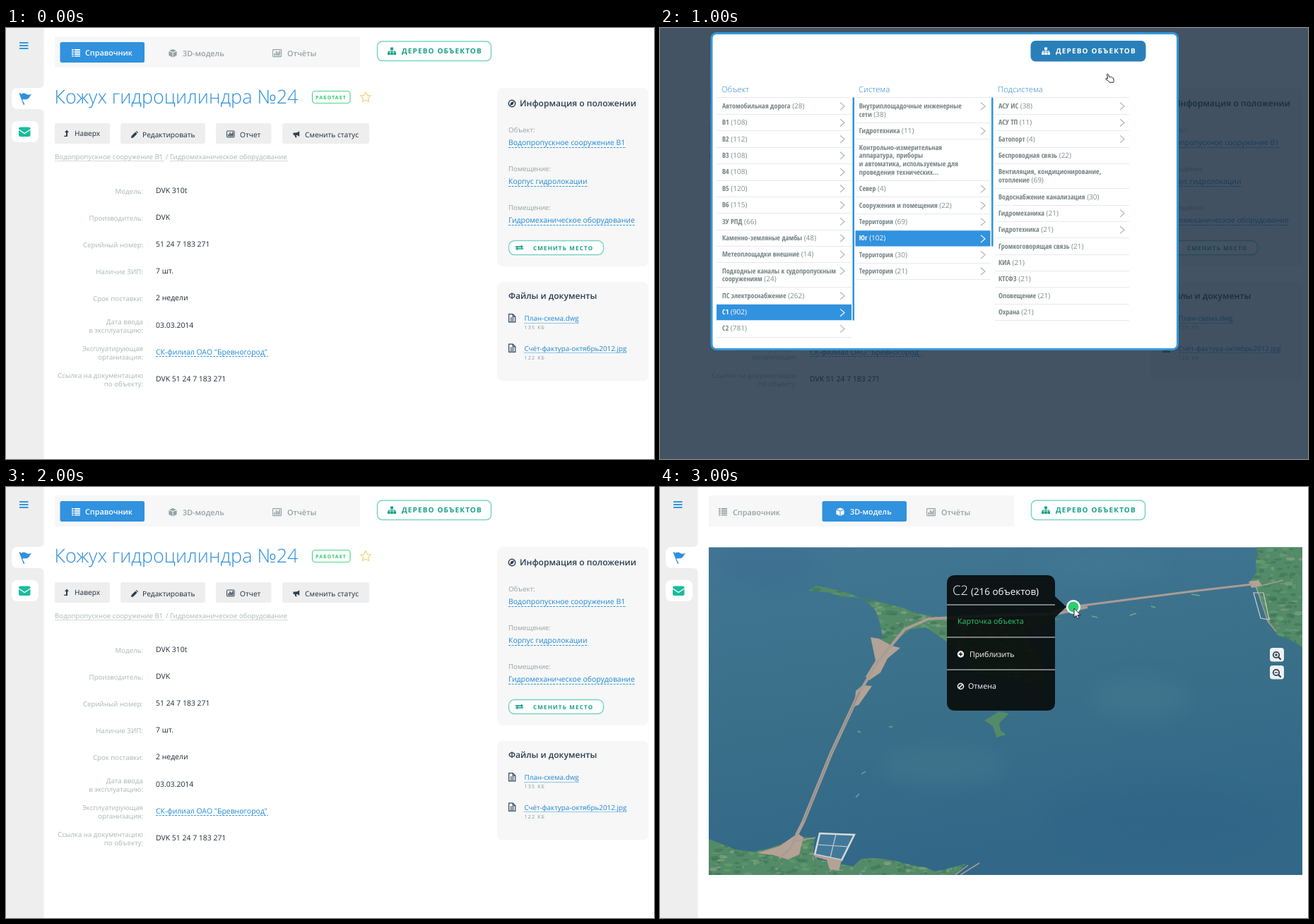
These frames come from a looping animation (917 px wide and 611 px high, 4 s). An HTML page:

```html
<!DOCTYPE html>
<html lang="ru">
<head>
<meta charset="utf-8">
<title>Справочник объектов</title>
<style>
html, body { margin: 0; width: 100%; height: 100%; overflow: hidden; background: #fff; }
svg { display: block; width: 917px; height: 611px; }
text { font: 10.45px "Open Sans", "Noto Sans", sans-serif; fill: #1d2b39; text-rendering: geometricPrecision; }
.page, .map, .modal, .side { animation: 4s step-end infinite; }
.page { animation-name: page; }
.map { animation-name: map; }
.modal { animation-name: modal; }
.side { animation-name: side; }
@keyframes page { 0% { visibility: visible } 75% { visibility: hidden } }
@keyframes map { 0% { visibility: hidden } 75% { visibility: visible } }
@keyframes modal { 0% { visibility: hidden } 25% { visibility: visible } 50% { visibility: hidden } }
@keyframes side { 0% { visibility: visible } 25% { visibility: hidden } 50% { visibility: visible } }
.tab { font-size: 10.8px; font-weight: 600; fill: #95a2a3; }
.on { fill: #fff; }
.caps { font-size: 10px; font-weight: 700; letter-spacing: 1.15px; fill: #16a085; }
.caps.on { fill: #fff; }
.caps.small { font-size: 8px; letter-spacing: 1.2px; }
.badge { font-size: 7px; font-weight: 700; letter-spacing: 1.1px; fill: #2ecc71; }
.h1 { font-size: 26.95px; font-weight: 300; fill: #2b8fdc; }
.btn { font-size: 10.2px; }
.label, .crumb { font-size: 9.7px; fill: #abb6b7; }
.label { text-anchor: end; }
.head { font-size: 12.08px; font-weight: 600; fill: #2c3e50; }
.cap { font-size: 9.7px; fill: #95a2a3; }
.link { fill: #1f87d3; }
.file { font-size: 9.85px; }
.size { font-size: 7px; letter-spacing: 1.2px; fill: #8a9798; }
.col { font-size: 11.4px; font-weight: 300; fill: #2585c7; }
.row { font-size: 10px; fill: #7f8c8d; }
.row .name { font-family: "Open Sans Condensed", "Open Sans", "Noto Sans", sans-serif; font-stretch: 75%; font-weight: 700; fill: #748283; }
.row.on, .row.on .name { fill: #fff; }
.menu { font-size: 10.7px; fill: #fff; }
.dash { stroke: #3498db; stroke-dasharray: 3 1.5; }
.i { fill: currentColor; }
.s { fill: none; stroke: currentColor; }
</style>
</head>
<body>
<svg viewBox="0 0 917 611">
<defs>
  <path id="list" class="i" d="M0 0h2.6v2H0zM3.8 0H12v2H3.8zM0 3h2.6v2H0zM3.8 3H12v2H3.8zM0 6h2.6v2H0zM3.8 6H12v2H3.8zM0 9h2.6v1.6H0zM3.8 9H12v1.6H3.8z"/>
  <path id="cube" class="i" d="M6 0l5 2L6 4.2 1 2zM.4 2.9l5.1 2.2V11.6L.4 9zM11.6 2.9L6.5 5.1v6.5L11.6 9z"/>
  <g id="chart"><rect class="s" x=".6" y=".6" width="12" height="10" rx=".8" stroke-width="1.1"/><path class="i" d="M2.4 6h1.7v3.2H2.4zM4.8 3h1.7v6.2H4.8zM7.2 4.6h1.7v4.6H7.2zM9.5 2.2h1.6v7H9.5z"/></g>
  <path id="tree" class="i" d="M4 0h4v3.4H6.5V5H11v2h1v3.4H8.4V7h1.4V6H6.5v1h1.3v3.4H4.2V7h1.3V6H2.2v1h1.4v3.4H0V7h1V5h4.5V3.4H4z"/>
  <g id="doc"><path class="s" stroke-width="1.2" d="M.6.6h5.6l3.6 3.6v7.6H.6zM6.2.6v3.6h3.6"/><path class="s" d="M2.5 6h5.4M2.5 8h5.4M2.5 10h5.4"/></g>
  <g id="zoom"><rect width="20" height="19.5" rx="4" fill="#eef0f1"/><circle cx="9" cy="10" r="4.2" fill="none" stroke="#2c3e50" stroke-width="1.8"/><path d="M12.2 13.2l2.8 2.8" stroke="#2c3e50" stroke-width="2.2" stroke-linecap="round"/><path d="M7 10h4" stroke="#2c3e50" stroke-width="1.3"/></g>
  <linearGradient id="sea" x2=".25" y2="1"><stop offset="0" stop-color="#417694"/><stop offset=".5" stop-color="#3a7089"/><stop offset="1" stop-color="#326788"/></linearGradient>
  <filter id="soft" x="-50%" y="-50%" width="200%" height="200%"><feGaussianBlur stdDeviation="14"/></filter>
  <clipPath id="frame"><path d="M69 85.500H909V550H69z"/></clipPath>
  <path id="land" d="M203 151l7-4 27 2 20 6 33 3 22 5 30 8 24 9 40 6 55 3 80-3 26 1-26 8-30 8 26 34 10 35-30 6-20-8-35-2-24-10-12-22-26-21-24-16-22 3-18 14-16 17-13 9-4-8 12-22-4-20-6-17-14-14-22-10-32-8-16-3zM844 85h65v142l-18-11-17-6-14-18-6-24-11-24-7-11 8-12-1-16 3-12zM69 499l18 7 20 8 26 3 22-5 30-11 12-6 22 3-2 20 6 10 50 10 12-11 22-1 26 4 22 6 20 3 14 6 16-3 20-6 8-2-14 16H69zM480 318l14 3-14 14 2 10 8 6-14 4-5-16-12-8z"/>
  <clipPath id="shore"><use href="#land"/></clipPath>
</defs>

<g class="side">
  <path fill="#eee" d="M0 0h53.500v611H0z"/>
  <path fill="#fff" d="M54 77q0 8-8 8H17q-9 0-9 9v12q0 9 9 9h29q8 0 8 8z"/>
  <rect x="8" y="132" width="38" height="30" rx="8" fill="#fff"/>
  <path stroke="#3498db" stroke-width="2" d="M19 21h12.500M19 25h12.500M19 29h12.500"/>
  <path fill="#3090dd" d="M18.500 92.500l1.600-.6 1.300 2.200c3-2.500 5.500-1.400 7.600-.2 2.400 1.200 4.600.8 7-.1-2.300 2.300-2.500 6-6.600 7.300-2.800.8-4-.6-6.300.6l3.300 6.600-1.600.8z"/>
  <rect x="18" y="140.500" width="16.500" height="13.500" rx="2.500" fill="#1abc9c"/>
  <path d="M18 144l8.200 5.500 8.300-5.500" fill="none" stroke="#fff" stroke-width="1.300"/>
</g>

<path fill="#f7f7f7" d="M69 12h432v44H69z"/>
<rect x="525.500" y="19" width="161" height="27.500" rx="7" fill="#fff" stroke="#79d3c6" stroke-width="1.500"/>
<use href="#tree" x="540" y="27.500" color="#16a085"/>
<text class="caps" x="560" y="36.300">ДЕРЕВО ОБЪЕКТОВ</text>
<use href="#chart" x="377" y="30" color="#95a2a3"/>
<text class="tab" x="398" y="39.500">Отчёты</text>

<g class="page">
  <rect x="76.500" y="20" width="119.500" height="29" rx="2.500" fill="#3192df"/>
  <use href="#list" x="93" y="30" color="#fff"/>
  <text class="tab on" x="112" y="38.800">Справочник</text>
  <use href="#cube" x="230" y="30" color="#95a2a3"/>
  <text class="tab" x="250" y="39.500">3D-модель</text>

  <text class="h1" x="68.500" y="106.500">Кожух гидроцилиндра №24</text>
  <rect x="433.500" y="89.500" width="53.500" height="17" rx="4" fill="none" stroke="#4fd488" stroke-width="1.200"/>
  <text class="badge" x="438" y="100.700">РАБОТАЕТ</text>
  <path fill="none" stroke="#f3d27a" stroke-width="1.200" stroke-linejoin="round" d="M509 90.500l2.200 4.800 5.200.6-3.900 3.500 1.100 5.100-4.600-2.600-4.600 2.600 1.100-5.100-3.900-3.500 5.200-.6z"/>

  <g fill="#eee">
    <rect x="69" y="135" width="78" height="29" rx="2"/><rect x="162" y="135" width="120" height="29" rx="3"/>
    <rect x="297" y="135" width="78.500" height="29" rx="3"/><rect x="391" y="135" width="123" height="29" rx="3"/>
  </g>
  <g fill="#2c3e50">
    <path d="M86 144.500l3 3.600h-2v6h-4.500l-1-1.400H85v-4.600h-2z"/>
    <path d="M177 156l.6-3 5.500-5.500 2.400 2.400-5.500 5.500zM183.800 146.800l.9-.8 2.400 2.300-.9.900z"/>
    <path d="M406.500 148.500h3.500c2.200 0 4-1.200 5.200-2.400v8c-1.200-1.200-2.900-2.100-4.600-2.300l1 3.500h-2.100l-1.200-3.600h-1.800z"/>
  </g>
  <use href="#chart" transform="translate(312 145.500) scale(.88)" color="#2c3e50"/>
  <text class="btn" x="97" y="153">Наверх</text>
  <text class="btn" x="193" y="154.500">Редактировать</text>
  <text class="btn" x="331" y="154.500">Отчет</text>
  <text class="btn" x="423" y="154.500">Сменить статус</text>

  <text class="crumb" x="69" y="185.500">Водопропускное сооружение В1</text>
  <text class="crumb" x="226" y="185.500">/</text>
  <text class="crumb" x="232" y="185.500">Гидромеханическое оборудование</text>
  <path stroke="#d3d9da" d="M69 188.500h154.500M232 188.500h167"/>
  <g id="specs"></g>
  <path class="dash" d="M212 465.500h159"/>

  <g fill="#f7f7f7"><rect x="695" y="85" width="214" height="253" rx="8"/><rect x="695" y="360" width="214" height="140.500" rx="8"/></g>
  <circle cx="716" cy="107" r="4.700" fill="none" stroke="#2c3e50" stroke-width="1.500"/>
  <path fill="#2c3e50" d="M719 104l-1.500 4.600-4.500 1.600 1.500-4.600z"/>
  <text class="head" x="727" y="111.300">Информация о положении</text>
  <text class="cap" x="711" y="148">Объект:</text>
  <text class="link" x="711" y="166.300">Водопропускное сооружение В1</text>
  <text class="cap" x="711" y="203">Помещение:</text>
  <text class="link" x="711" y="221.300">Корпус гидролокации</text>
  <text class="cap" x="711" y="258">Помещение:</text>
  <text class="link" x="711" y="276.300">Гидромеханическое оборудование</text>
  <path class="dash" d="M711 169.500h167M711 224.500h113M711 279.500h179"/>
  <rect x="711.500" y="301.500" width="134" height="20" rx="8" fill="#fff" stroke="#79d3c6" stroke-width="1.400"/>
  <path fill="#16a085" d="M721 309.300h8v-1.800l3 2.600-3 2.600v-1.800h-8zM732 313.800h-8v1.800l-3-2.600 3-2.600v1.800h8z"/>
  <text class="caps small" x="746" y="314.700">СМЕНИТЬ МЕСТО</text>
  <text class="head" x="711" y="384">Файлы и документы</text>
  <use href="#doc" x="711" y="405" color="#34495e"/><use href="#doc" x="711" y="447.500" color="#34495e"/>
  <text class="link file" x="733.500" y="415">План-схема.dwg</text>
  <text class="size" x="733.500" y="426.700">135 КБ</text>
  <text class="link file" x="733.500" y="457.700">Счёт-фактура-октябрь2012.jpg</text>
  <text class="size" x="733.500" y="469.500">122 КБ</text>
  <path stroke="#8fc6ec" d="M733 418.500h78M733 460.500h145"/>
</g>

<g class="modal">
  <path fill="#15283c" opacity=".8" d="M0 0h917v611H0z"/>
  <rect x="73" y="7.500" width="659.500" height="448" rx="7" fill="#fff" stroke="#3498db" stroke-width="3"/>
  <rect x="524.500" y="18" width="163" height="29.500" rx="7" fill="#2980b9"/>
  <use href="#tree" x="540" y="27.500" color="#fff"/>
  <text class="caps on" x="560" y="36.300">ДЕРЕВО ОБЪЕКТОВ</text>
  <text class="col" x="87" y="90.500">Объект</text>
  <text class="col" x="281" y="90.500">Система</text>
  <text class="col" x="478" y="90.500">Подсистема</text>
  <g id="lists"></g>
  <path fill="#3192df" d="M272.500 98.500h2.500v316h-2.500zM469 98.500h2.500v211H469z"/>
  <path fill="#fff" stroke="#222" stroke-linejoin="round" d="M632.500 65.500q1.200-1 2 .4l1.300 3.600 1.500-.3 1 .6 1.300-.2.800 1 .9.300 1 3.500-.8 2.800h-5.300l-2.300-2.700-3-1.800q-.6-1.200.7-1.500l2 .6z"/>
</g>

<g class="map">
  <rect x="229.500" y="20" width="119.500" height="29" rx="2.500" fill="#3192df"/>
  <use href="#list" x="83" y="30" color="#95a2a3"/>
  <text class="tab" x="103" y="39.500">Справочник</text>
  <use href="#cube" x="249" y="29.500" color="#fff"/>
  <text class="tab on" x="269" y="39">3D-модель</text>
  <g clip-path="url(#frame)">
    <path fill="url(#sea)" d="M69 85h840v465H69z"/>
    <g filter="url(#soft)" opacity=".3">
      <ellipse cx="400" cy="395" rx="90" ry="30" fill="#4c8290"/><ellipse cx="680" cy="300" rx="70" ry="30" fill="#4b8494"/>
      <ellipse cx="150" cy="110" rx="70" ry="25" fill="#3a658f"/><ellipse cx="700" cy="470" rx="150" ry="45" fill="#2d6088"/>
      <ellipse cx="620" cy="110" rx="100" ry="20" fill="#4c829b"/>
    </g>
    <use href="#land" fill="#538a67"/>
    <g id="woods" clip-path="url(#shore)"></g>
    <g fill="#b3a295">
      <path d="M298 213l12 2 18 10 12 3-18 15-10 20-16 11-5-5 14-23zM137 519l32-10 26-18 8 6-6 24-16 7-20-6z"/>
      <path d="M277 289l10-8 13 1-9 13-10 14-6 2zM833 134l14-2 5 8-15 3z"/>
    </g>
    <g fill="none" stroke="#a99c95">
      <path stroke-width="5" d="M285 285L242 378 203 474l-10 20"/>
      <path stroke="#7f8587" d="M285 285L242 378 203 474"/>
      <path stroke-width="3" d="M193 494l-8 18-16 14"/>
      <path stroke-width="4" d="M283 290l25-42 38-46 34-15 90-5 90-2 45-10"/>
      <path stroke-width="3" d="M555 177l35-8 100-13 70-9 78-9"/>
      <path stroke-width="1.500" d="M843 140l17 50 12 15M850 140l32-8M190 502l30-5M240 545l14-12M418 550l18-14M425 550l27-17"/>
    </g>
    <path fill="none" stroke="#79a48a" stroke-width="1.500" d="M280 346l4 2M285 407l6-4M277 440l5-5M324 340h5M611 183l8 2M665 182l9-3M752 152l12 2M695 169l6 2"/>
    <path fill="#41799b" stroke="#d9dad8" stroke-width="2.500" d="M226 491l49 2-18 36-38-8z"/>
    <path fill="none" stroke="#c9cfcd" stroke-width="1.200" d="M249 492l-8 33M222 507l45 3M840 150h14l8 38-12-2z"/>
    <path fill="#b3a295" d="M219 521l38 8-4 15-13-2-4-13-17-5z"/>
  </g>
  <path fill="#070b09" opacity=".9" d="M418 125h129q12 0 12 12v18l16 15-16 15v120q0 12-12 12H418q-12 0-12-12V137q0-12 12-12z"/>
  <path stroke="#e8e8e8" stroke-width="1.200" d="M406 167h153M406 213h153M406 259h153"/>
  <text class="menu" x="414" y="153"><tspan font-weight="300" style="font-size:18.600px">С2</tspan></text>
  <text class="menu" x="440" y="153" style="font-size:13.400px">(216 объектов)</text>
  <text class="menu" x="421" y="193.800" style="fill:#2ecc71">Карточка объекта</text>
  <circle cx="425.500" cy="237" r="4.700" fill="#fff"/><path stroke="#111" stroke-width="1.500" d="M422.800 237h5.400M425.500 234.300v5.400"/>
  <text class="menu" x="438" y="240.700">Приблизить</text>
  <path fill="none" stroke="#fff" stroke-width="1.500" d="M421.500 282.500a4 4 0 1 0 8 0a4 4 0 1 0-8 0M422.800 285.300l5.400-5.600"/>
  <text class="menu" x="436" y="286.300">Отмена</text>
  <circle cx="585" cy="170" r="8.800" fill="#2ecc71" stroke="#fff" stroke-width="2.500"/>
  <path fill="#fff" stroke="#222" stroke-linejoin="round" d="M586 172v13l3-2.800 2 4.700 2-.9-2-4.500h4z"/>
  <use href="#zoom" x="863" y="228"/><path stroke="#2c3e50" stroke-width="1.300" d="M872 236v4"/>
  <use href="#zoom" x="863" y="253"/>
</g>
</svg>
<script>
const $ = id => document.getElementById(id);
const text = (cls, x, y, s) => `<text class="${cls}" x="${x}" y="${y}">${s}</text>`;

// Names may hold "|" as a line break in the label.
const specs = [
  ['Модель:', 'DVK 310t'],
  ['Производитель:', 'DVK'],
  ['Серийный номер:', '51 24 7 183 271'],
  ['Наличие ЗИП:', '7 шт.'],
  ['Срок поставки:', '2 недели'],
  ['Дата ввода|в эксплуатацию:', '03.03.2014'],
  ['Эксплуатирующая|организация:', 'СК-филиал ОАО "Бревногород"', 'link'],
  ['Ссылка на документацию|по объекту:', 'DVK 51 24 7 183 271']
];
$('specs').innerHTML = specs.map(([label, value, cls = ''], i) => {
  const y = 233.8 + 38.15 * i, lines = label.split('|');
  const top = lines.length > 1 ? y - 5 : y + .9;
  return lines.map((s, k) => text('label', 194, top + 12.2 * k, s)).join('') + text(cls, 212, y, value);
}).join('');

// Each row: name, count, then ">" for an arrow or "*" for the selected row.
const cols = [
  [80, 191, `Автомобильная дорога;28;>/В1;108;>/В2;112;>/В3;108;>/В4;108;>/В5;120;>/В6;115;>/ЗУ РПД;66;>/Каменно-земляные дамбы;48;>/Метеоплощадки внешние;14;>/Подходные каналы к судопропускным|сооружениям;24;>/ПС электроснабжение;262;>/С1;902;*/С2;781;>`],
  [276.5, 191, `Внутриплощадочные инженерные|сети;38;>/Гидротехника;11;>/Контрольно-измерительная|аппаратура, приборы|и автоматика, используемые для|проведения технических...;;/Север;4;>/Сооружения и помещения;22;>/Территория;69;>/Юг;102;*/Территория;30;>/Территория;21;>`],
  [474, 190, `АСУ ИС;38;>/АСУ ТП;11;>/Батопорт;4;>/Беспроводная связь;22;/Вентиляция, кондиционирование,|отопление;69;/Водоснабжение канализация;30;/Гидромеханика;21;>/Гидротехника;21;>/Громкоговорящая связь;21;/КИА;21;/КТСФЗ;21;/Оповещение;21;/Охрана;21;`]
];
const rule = (x, y, w) => `<path stroke="#e6eaea" d="M${x} ${Math.round(y) + .5}h${w}"/>`;
$('lists').innerHTML = cols.map(([x, w, data], c) => {
  let y = 98.7, out = rule(x, 98.4, w);
  const tx = x + [8, 5.3, 5][c], ax = x + [175, 177.5, 177][c];
  for (const item of data.split('/')) {
    const [name, count, mark] = item.split(';'), lines = name.split('|'), on = mark === '*';
    if (on) out += `<path fill="#3192df" d="M${x} ${y + 1.2}h${w}v22.300h-${w}z"/>`;
    lines.forEach((s, k) => {
      const tail = count && k === lines.length - 1 ? ` (${count})` : '';
      out += text(on ? 'row on' : 'row', tx, y + 15.3 + 11.8 * k, `<tspan class="name">${s}</tspan>${tail}`);
    });
    if (mark) out += `<path fill="none" stroke="${on ? '#fff' : '#a5b1b2'}" stroke-width="1.100" d="M${ax} ${y + 7 + (on ? .5 : 0)}l6 5.200-6 5.200"/>`;
    y += 23.36 + 11.8 * (lines.length - 1);
    if (!on) out += rule(x, y, w);
  }
  return out;
}).join('');

// Tree cover and clearings scattered over the land.
let seed = 7;
const rnd = () => (seed = seed * 16807 % 2147483647) / 2147483647;
const tones = ['#3f7558', '#3f7558', '#67a072', '#8fa588'];
const areas = [[205, 145, 320, 165], [834, 85, 75, 140], [69, 488, 385, 62]];
$('woods').innerHTML = areas.map(([x, y, w, h]) => Array.from({ length: w * h / 60 }, () =>
  `<ellipse cx="${x + rnd() * w}" cy="${y + rnd() * h}" rx="${1 + rnd() * 6}" ry="${.6 + rnd() * 2.6}" fill="${tones[rnd() * 4 | 0]}" opacity=".6"/>`
).join('')).join('');
</script>
</body>
</html>
```
